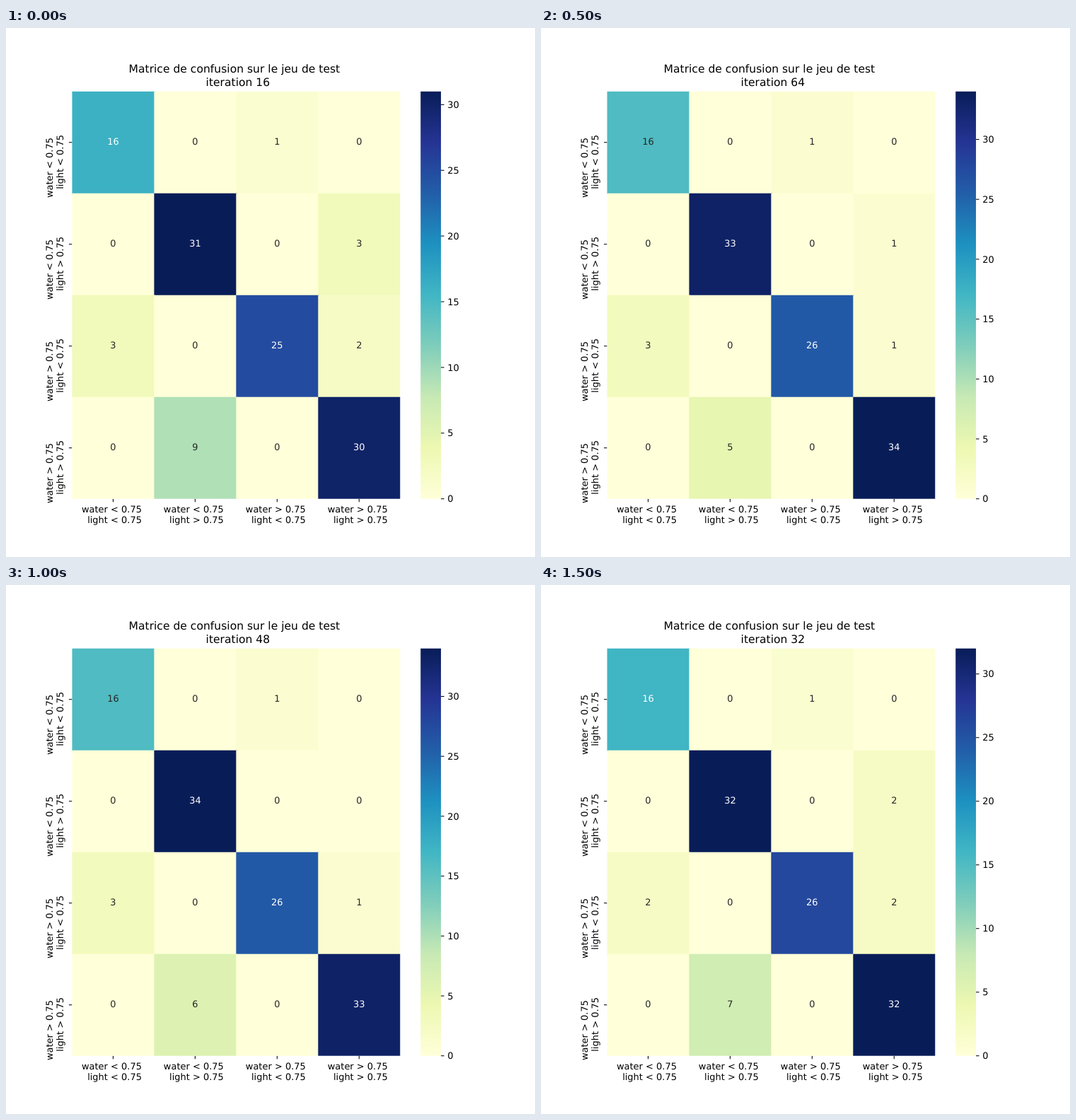
An HTML page for the animation above (2000 ms loop, 748 by 748 pixels).

```html
<!DOCTYPE html>
<html lang="fr">
<head>
<meta charset="utf-8">
<title>Matrice de confusion</title>
<style>
  html, body { margin: 0; width: 100%; height: 100%; overflow: hidden; background: #fff; }
  svg { display: block; width: 748px; height: 748px; }
  text { font: 13.889px "DejaVu Sans", sans-serif; text-rendering: geometricPrecision; }
  .title { font-size: 16.667px; }
  .mid { text-anchor: middle; }
  .end { text-anchor: end; }
</style>
</head>
<body>
<svg viewBox="0 0 800 800"></svg>
<script>
const STEP = 500;
const steps = [
  { iter: 16, cells: [16, 0, 1, 0, 0, 31, 0, 3, 3, 0, 25, 2, 0, 9, 0, 30] },
  { iter: 64, cells: [16, 0, 1, 0, 0, 33, 0, 1, 3, 0, 26, 1, 0, 5, 0, 34] },
  { iter: 48, cells: [16, 0, 1, 0, 0, 34, 0, 0, 3, 0, 26, 1, 0, 6, 0, 33] },
  { iter: 32, cells: [16, 0, 1, 0, 0, 32, 0, 2, 2, 0, 26, 2, 0, 7, 0, 32] },
];
const ramp = ["ffffd9", "edf8b1", "c7e9b4", "7fcdbb", "41b6c4", "1d91c0", "225ea8", "253494", "081d58"];
const rgb = ramp.map(h => [0, 2, 4].map(i => parseInt(h.slice(i, i + 2), 16)));

const grid = { x: 100, y: 96, w: 124, h: 154, right: 596, bottom: 712 };
const bar = { x: 627, w: 30.8, h: 616 };
const svg = document.querySelector("svg");

function add(parent, tag, attrs, text) {
  const el = document.createElementNS("http://www.w3.org/2000/svg", tag);
  for (const k in attrs) el.setAttribute(k, attrs[k]);
  if (text !== undefined) el.textContent = text;
  return parent.appendChild(el);
}

function label(parent, text, x, y, cls = "", fill = "#000") {
  return add(parent, "text", { x, y, class: cls, fill }, text);
}

function tick(parent, x, y, dx, dy) {
  add(parent, "path", { d: `M${x} ${y}l${dx} ${dy}`, stroke: "#000", "stroke-width": 1.11 });
}

// Colour of a 256-entry map, linear between the ramp colours
function color(t) {
  const p = Math.min(255, Math.floor(t * 256)) / 255 * 8;
  const i = Math.min(7, Math.floor(p));
  return `rgb(${rgb[i].map((c, k) => Math.round(c + (rgb[i + 1][k] - c) * (p - i)))})`;
}

function drawFixed() {
  const grad = add(add(svg, "defs"), "linearGradient", { id: "ramp", x1: 0, y1: 1, x2: 0, y2: 0 });
  ramp.forEach((c, i) => add(grad, "stop", { offset: i / 8, "stop-color": "#" + c }));
  add(svg, "rect", { x: bar.x, y: grid.y, width: bar.w, height: bar.h, fill: "url(#ramp)" });

  label(svg, "Matrice de confusion sur le jeu de test", 345.35, 67.9, "title mid");

  for (let i = 0; i < 4; i++) {
    const water = `water ${i < 2 ? "<" : ">"} 0.75`;
    const light = `light ${i % 2 ? ">" : "<"} 0.75`;
    const cx = grid.x + (i + 0.5) * grid.w;
    const cy = grid.y + (i + 0.5) * grid.h;
    tick(svg, cx, grid.bottom, 0, 4.86);
    tick(svg, grid.x, cy, -4.86, 0);
    label(svg, water, cx - 2.2, 732.8, "mid");
    label(svg, light, cx + 2.2, 749, "mid");
    const side = add(svg, "g", { transform: `translate(0 ${cy - 11.5}) rotate(-90)` });
    label(side, water, -4.4, 71, "end");
    label(side, light, 0, 87.1, "end");
  }
}

function drawStep({ iter, cells }) {
  const g = add(svg, "g", { visibility: "hidden" });
  const max = Math.max(...cells);
  label(g, `iteration ${iter}`, 350.65, 87.7, "title mid");

  // Inner edges overlap slightly so that no seams show
  cells.forEach((v, i) => {
    const x = grid.x + (i % 4) * grid.w;
    const y = grid.y + Math.floor(i / 4) * grid.h;
    add(g, "rect", {
      x, y, fill: color(v / max),
      width: Math.min(grid.w + 2, grid.right - x),
      height: Math.min(grid.h + 2, grid.bottom - y),
    });
  });
  cells.forEach((v, i) => {
    const x = grid.x + (i % 4 + 0.5) * grid.w;
    const y = grid.y + (Math.floor(i / 4) + 0.5) * grid.h;
    label(g, v, x, y + 4, "mid", v / max < 0.48 ? "#262626" : "#fff");
  });

  for (let v = 0; v <= max; v += 5) {
    const y = grid.bottom - v / max * bar.h;
    tick(g, bar.x + bar.w, y, 4.86, 0);
    label(g, v, bar.x + bar.w + 9.72, y + 5);
  }
  return g;
}

drawFixed();
const views = steps.map(drawStep);

function show() {
  const now = Math.floor(performance.now() / STEP) % views.length;
  views.forEach((g, i) => g.setAttribute("visibility", i === now ? "visible" : "hidden"));
  requestAnimationFrame(show);
}
show();
</script>
</body>
</html>
```
